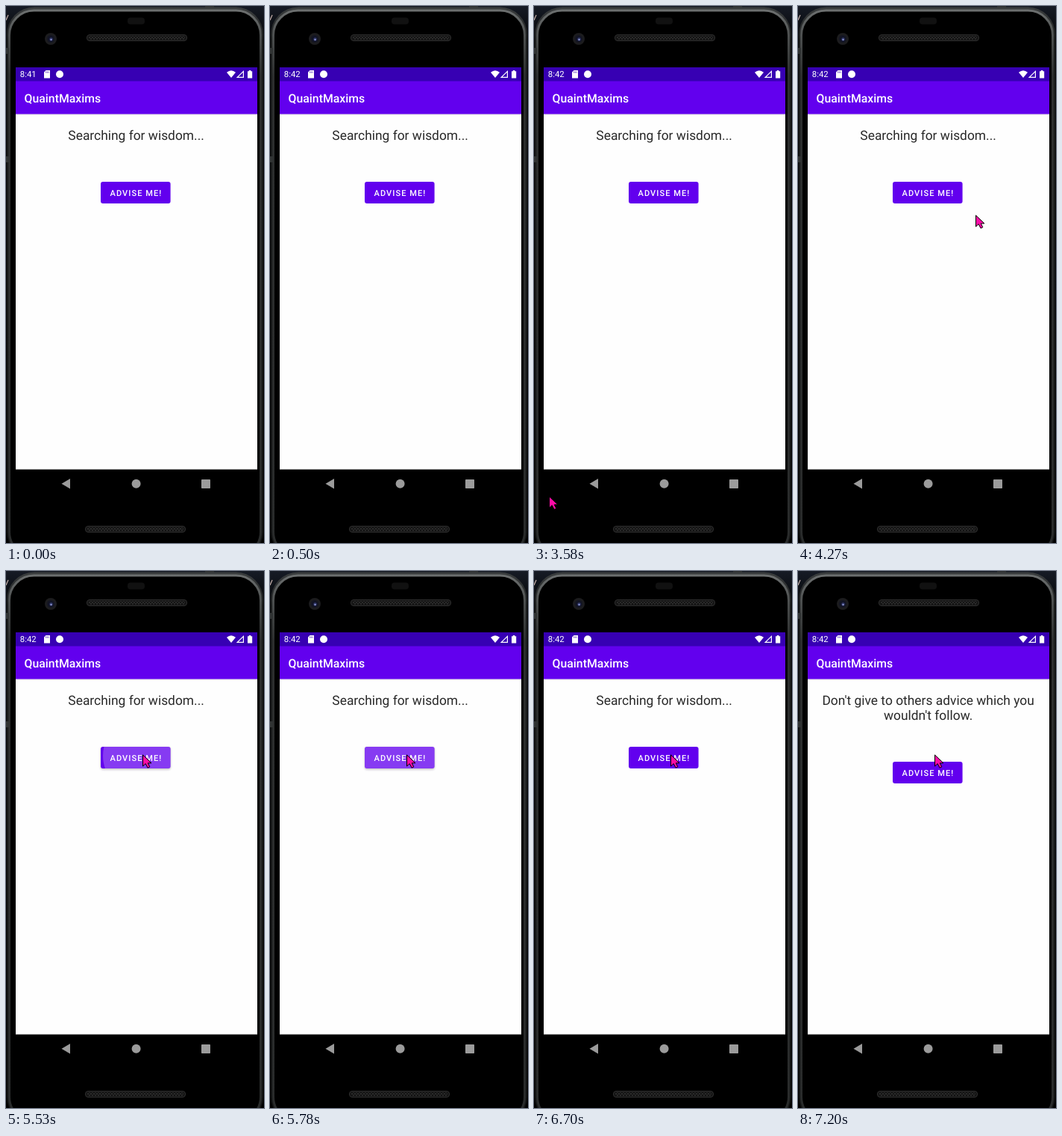
These frames come from a looping animation (346x718 px, 8000 ms). An HTML page:

```html
<!DOCTYPE html>
<html lang="en">
<head>
<meta charset="utf-8">
<title>Advice app</title>
<style>
  html, body { margin: 0; width: 100%; height: 100%; overflow: hidden; background: #000; }
  svg { display: block; width: 346px; height: 718px; }
  text { font-family: Roboto, sans-serif; fill: #fff; text-rendering: geometricPrecision; }
  .medium { font-weight: 500; }
  .quote { font-size: 17.4px; fill: #292929; text-anchor: middle; }
</style>
</head>
<body>
<svg viewBox="0 0 346 718">
  <defs>
    <linearGradient id="backdrop" x2="0" y2="1">
      <stop offset="0" stop-color="#161b25"/>
      <stop offset=".06" stop-color="#050608"/>
      <stop offset="1" stop-color="#000"/>
    </linearGradient>
    <linearGradient id="rim" x2="0" y2="1">
      <stop offset="0" stop-color="#3b3e3f"/>
      <stop offset=".06" stop-color="#1c1e1e"/>
      <stop offset="1" stop-color="#121313"/>
    </linearGradient>
    <linearGradient id="edge" x2="0" y2="1">
      <stop offset="0" stop-color="#6c6f6f"/>
      <stop offset=".05" stop-color="#4a4d4d"/>
      <stop offset=".12" stop-color="#2c2e2e"/>
      <stop offset="1" stop-color="#292b2b"/>
    </linearGradient>
    <linearGradient id="barShadow" x2="0" y2="1">
      <stop offset="0" stop-opacity=".14"/>
      <stop offset="1" stop-opacity="0"/>
    </linearGradient>
    <pattern id="mesh" width="4" height="4" patternUnits="userSpaceOnUse">
      <path d="M0 0L4 4M4 0L0 4" stroke="#303030" stroke-width=".8"/>
    </pattern>
    <clipPath id="face"><rect x="127" y="235" width="93.6" height="29" rx="3"/></clipPath>
    <filter id="soft" x="-10%" y="-30%" width="120%" height="160%"><feGaussianBlur stdDeviation="1.4"/></filter>
    <g id="grille">
      <rect x=".5" y=".5" width="134" height="8" rx="3.5" fill="#141414" stroke="#2f2f2f"/>
      <rect x="3" y="2" width="129" height="5" rx="2" fill="url(#mesh)"/>
    </g>
  </defs>

  <!-- phone body -->
  <rect width="346" height="718" fill="url(#backdrop)"/>
  <path d="M0 19L3 12" stroke="#c9b3ad" stroke-width="1.2"/>
  <rect x="267" y="0" width="12" height="4" fill="#2b2d2f"/>
  <rect x="1" y="1.5" width="344" height="738" rx="37" fill="url(#rim)"/>
  <rect x="4.5" y="6" width="337" height="730" rx="33" fill="#000" stroke="url(#edge)" stroke-width="3"/>
  <path d="M0 56h4v8H0zM0 201h4v8H0z" fill="#303333"/>
  <rect x="163" y="15.5" width="23" height="9" rx="4" fill="#111"/>
  <circle cx="60" cy="44" r="8" fill="#1c1c1e"/>
  <circle cx="60" cy="44" r="4.8" fill="#121424"/>
  <circle cx="60.5" cy="44.5" r="2.2" fill="#353c70"/>
  <circle cx="60.5" cy="45" r="1" fill="#a2abe0"/>
  <use href="#grille" x="108" y="38"/>
  <use href="#grille" x="106" y="695"/>

  <!-- screen -->
  <rect x="13" y="82" width="324" height="537.6" fill="#fefefe"/>
  <rect x="13" y="144.5" width="324" height="2" fill="url(#barShadow)"/>
  <rect x="13" y="82" width="324" height="19" fill="#3700b3"/>
  <rect x="13" y="100.5" width="324" height="44" fill="#6200ee"/>
  <text id="clock" x="18.8" y="95.4" font-size="11.3"></text>
  <g fill="#fff">
    <path d="M53.5 86H59v10.5H51V88.5z"/>
    <circle cx="72" cy="91.3" r="5"/>
    <path d="M296 88.7Q302 83.6 308 88.7L302 96z"/>
    <path d="M318.4 87.4V95.4H310.2z" fill="none" stroke="#fff" stroke-width="1.2"/>
    <path d="M324 87.2h1.8V86h2.6v1.2h1.8v9.3H324z"/>
  </g>
  <path d="M53.6 87.5v2M55.3 87.5v2M57 87.5v2" stroke="#3700b3" stroke-width=".7"/>
  <text class="medium" x="24.6" y="129" font-size="15.8">QuaintMaxims</text>

  <text id="line1" class="quote" x="174.6" y="179"></text>
  <text id="line2" class="quote" x="174.6" y="199.4"></text>

  <g id="button">
    <rect id="shadow" x="127" y="236" width="93.6" height="29.5" rx="3" opacity=".24" filter="url(#soft)"/>
    <rect x="127" y="235" width="93.6" height="29" rx="3" fill="#6200ee"/>
    <g clip-path="url(#face)"><circle id="ripple" cx="183" cy="247" fill="#fff" opacity=".23"/></g>
    <text class="medium" x="139.6" y="253.6" font-size="11.05" letter-spacing="1.03">ADVISE ME!</text>
  </g>

  <!-- navigation -->
  <g fill="#9b9b9b">
    <path d="M74.5 638.7L86 632v13.4z"/>
    <circle cx="174.6" cy="638.7" r="6"/>
    <rect x="262" y="633" width="12" height="12" rx=".8"/>
  </g>

  <path id="cursor" d="M.5 .9V16L4.2 12.6L7.1 18.2L9.8 16.8L7.3 11.8H12Z" fill="#fb0ca6" stroke="#000"/>
</svg>
<script>
  const LOOP = 8000;
  const $ = id => document.getElementById(id);
  const [clock, line1, line2, button, shadow, ripple, cursor] =
    ["clock", "line1", "line2", "button", "shadow", "ripple", "cursor"].map($);

  // [time, x, y]; without a position the pointer is hidden
  const pointer = [
    [0], [3580, 20, 655], [3860, 253, 639], [3980],
    [4270, 238, 279], [4390, 218, 258], [4510, 199, 241], [4630, 188, 236], [4750, 183, 245]
  ];
  // [time, ripple radius]
  const press = [[0, 0], [5530, 53], [5780, 90], [6700, 0]];

  const at = (steps, t) => steps.findLast(s => s[0] <= t);
  const show = (el, on) => el.setAttribute("visibility", on ? "visible" : "hidden");

  function draw(t) {
    const [, x, y] = at(pointer, t);
    const radius = at(press, t)[1];
    const answered = t >= 7200;

    clock.textContent = t < 500 ? "8:41" : "8:42";
    line1.textContent = answered ? "Don't give to others advice which you" : "Searching for wisdom...";
    line2.textContent = answered ? "wouldn't follow." : "";
    button.setAttribute("transform", `translate(0 ${answered ? 20 : 0})`);
    ripple.setAttribute("r", radius);
    show(shadow, radius > 0);
    show(cursor, x !== undefined);
    if (x !== undefined) cursor.setAttribute("transform", `translate(${x} ${y})`);
  }

  const start = performance.now();
  function tick() {
    draw((performance.now() - start) % LOOP);
    requestAnimationFrame(tick);
  }
  tick();
</script>
</body>
</html>
```
